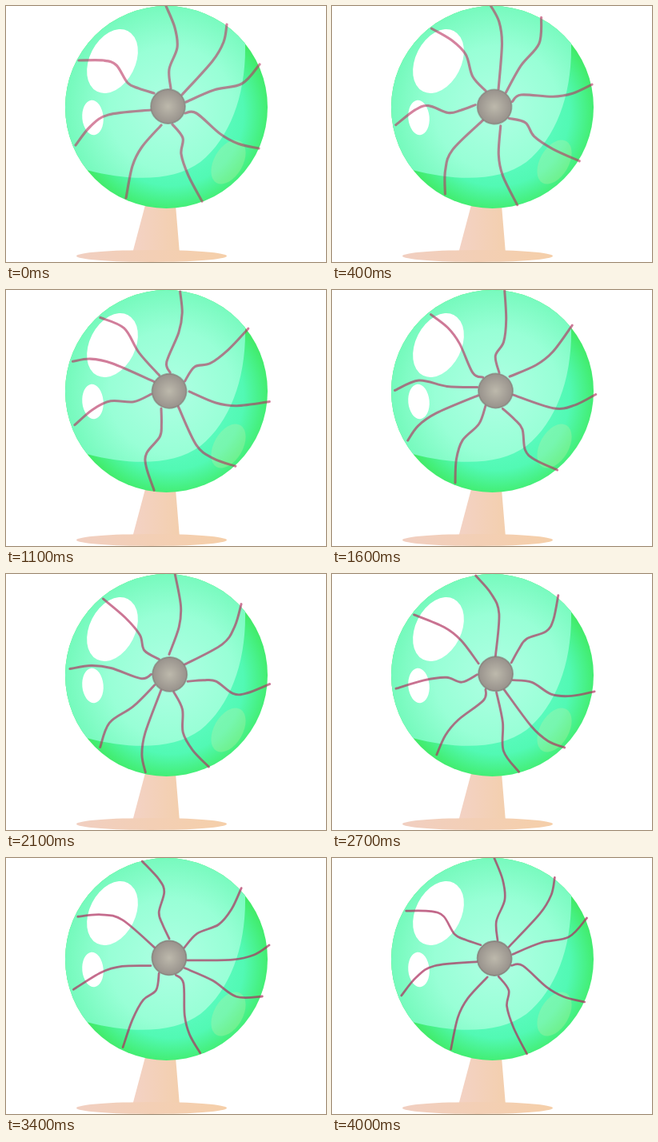
Write an HTML page with a canvas that moves like this. It is 400 px wide and 320 px high and loops after 4.1 s.

```html
<!DOCTYPE html>
<html lang="en">
<head>
<meta charset="utf-8">
<title>Plasma globe</title>
<style>
html, body { margin: 0; width: 100%; height: 100%; overflow: hidden; background: #fff; }
canvas { display: block; }
</style>
</head>
<body>
<canvas id="stage" width="400" height="320"></canvas>
<script>
const ctx = document.getElementById('stage').getContext('2d');
const LOOP = 4100, STEP = 100;
const BALL = { x: 200.5, y: 126.5, r: 126.5 };
const HUB = { x: 202.5, y: 125.5, r: 21.5 };

// Smooth curve through a few points, measured from the hub.
function addArc(path, points) {
  const pts = points.split(' ').map(p => {
    const [x, y] = p.split(',').map(Number);
    return { x: x - HUB.x, y: y - HUB.y };
  });
  const at = i => pts[Math.max(0, Math.min(pts.length - 1, i))];
  path.moveTo(pts[0].x, pts[0].y);
  for (let i = 0; i < pts.length - 1; i++) {
    const [a, b, c, d] = [at(i - 1), at(i), at(i + 1), at(i + 2)];
    path.bezierCurveTo(
      b.x + (c.x - a.x) / 6, b.y + (c.y - a.y) / 6,
      c.x - (d.x - b.x) / 6, c.y - (d.y - b.y) / 6,
      c.x, c.y);
  }
}

// The eight arcs form one rigid figure that spins around the hub.
const plasma = new Path2D();
[
  '200,0 211,27 214,52 204,79 206,103',
  '276,23 272,45 258,69 220,111',
  '317,73 295,97 260,105 225,120',
  '316,178 290,172 268,160 238,134 224,134',
  '245,244 228,212 219,185 221,165 208,148',
  '150,240 158,200 170,176 194,149',
  '87,174 105,151 128,136 181,130',
  '91,68 122,68 138,74 152,96 166,103 185,109'
].forEach(points => addArc(plasma, points));

// Counterclockwise turn in degrees at a few times; steady in between.
const turnKeys = [[0, 0], [400, 37.7], [1100, 108.6], [2100, 201.7],
  [2700, 258.7], [3400, 312.9], [4000, 359]];

function turnAt(time) {
  const next = Math.max(1, turnKeys.findIndex(([t]) => t >= time));
  const [t0, a0] = turnKeys[next - 1], [t1, a1] = turnKeys[next];
  return a0 + (a1 - a0) * (time - t0) / (t1 - t0);
}

function gradient(g, ...colors) {
  colors.forEach(([stop, color]) => g.addColorStop(stop, color));
  return g;
}

function ellipse(x, y, rx, ry, degrees, fill) {
  ctx.beginPath();
  ctx.ellipse(x, y, rx, ry, degrees * Math.PI / 180, 0, Math.PI * 2);
  ctx.fillStyle = fill;
  ctx.fill();
}

const standFill = gradient(ctx.createLinearGradient(158, 0, 217, 0),
  [0, '#f3d2c5'], [1, '#f3cfae']);
const footFill = gradient(ctx.createLinearGradient(88, 0, 276, 0),
  [0, '#f1cfc1'], [1, '#f5cfa9']);
const glassFill = gradient(ctx.createRadialGradient(206, 134, 0, 206, 134, 130),
  [0, '#6effd7'], [0.7, '#52f9b4'], [0.9, '#44ef7a'], [1, '#40e85f']);
const shineFill = gradient(ctx.createRadialGradient(206, 128, 0, 206, 128, 130),
  [0, '#aeffe3'], [0.6, '#98ffd6'], [1, '#76fabd']);
const hubFill = gradient(ctx.createRadialGradient(0, 0, 0, 0, 0, 22),
  [0, '#bdb9ac'], [1, '#97918b']);

function drawStand() {
  ctx.fillStyle = standFill;
  ctx.beginPath();
  ctx.moveTo(174, 249);
  ctx.lineTo(212, 249);
  ctx.lineTo(217, 309);
  ctx.lineTo(158, 309);
  ctx.fill();
  ellipse(182, 312.5, 94, 7.5, 0, footFill);
}

function drawGlass() {
  ellipse(BALL.x, BALL.y, BALL.r, BALL.r, 0, glassFill);
  ctx.save();
  ctx.clip();
  ctx.beginPath();
  ctx.moveTo(299, 48);
  ctx.bezierCurveTo(300, 110, 281, 164, 243, 195);
  ctx.bezierCurveTo(209, 220, 154, 219, 101, 205);
  ctx.lineTo(60, 205);
  ctx.lineTo(60, -10);
  ctx.lineTo(299, -10);
  ctx.fillStyle = shineFill;
  ctx.fill();
  ctx.restore();
  ellipse(133, 69, 28.5, 42.5, 27, '#fff');
  ellipse(108.5, 139.5, 13.2, 21.8, -5, '#fff');
  ellipse(278, 195, 18, 30, 30, 'rgba(190,240,165,0.33)');
}

function drawPlasma(time) {
  const progress = time / LOOP;
  const strength = 0.58 + 0.14 * progress;
  const wobble = 0.8 * Math.sin(2 * Math.PI * time / 4000);
  ctx.save();
  ctx.translate(HUB.x + 2.2 * Math.sin(Math.PI * time / 4400), HUB.y + wobble);
  ctx.rotate(-turnAt(time) * Math.PI / 180);
  ctx.lineCap = 'round';
  ctx.lineJoin = 'round';
  ctx.lineWidth = 3.2 - 0.5 * progress;
  ctx.strokeStyle = `rgba(${185 - 15 * progress},45,92,${strength})`;
  ctx.stroke(plasma);

  ellipse(0, 0, HUB.r, HUB.r, 0, hubFill);
  ctx.lineWidth = 1.8;
  ctx.strokeStyle = `rgba(132,120,117,${strength})`;
  ctx.stroke();
  ctx.restore();
}

function render() {
  const time = Math.floor(performance.now() % LOOP / STEP) * STEP;
  ctx.fillStyle = '#fff';
  ctx.fillRect(0, 0, 400, 320);
  drawStand();
  drawGlass();
  drawPlasma(time);
  requestAnimationFrame(render);
}
render();
</script>
</body>
</html>
```
